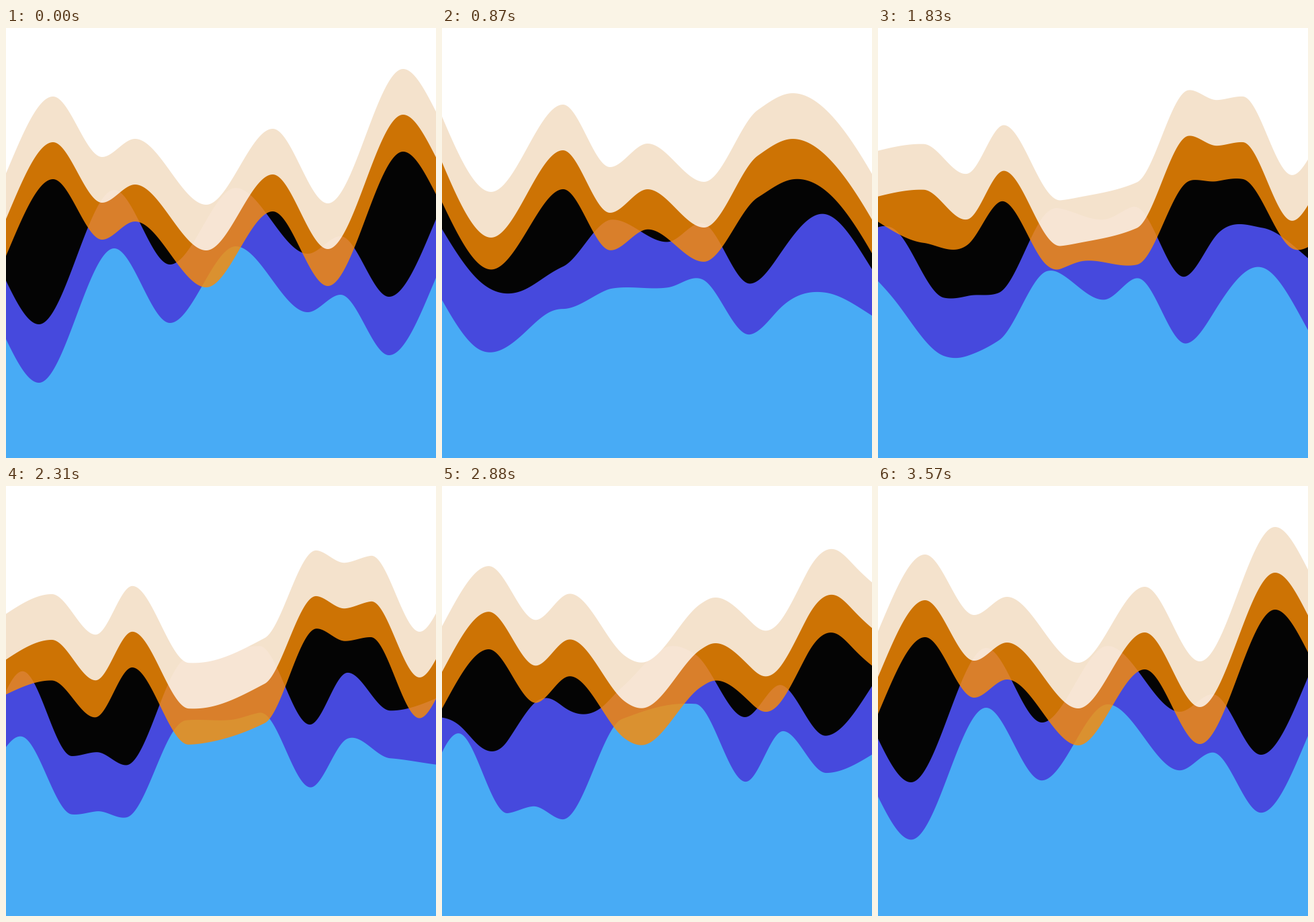
These frames come from a looping animation (640x640 px, 3630 ms). A matplotlib script:

```python
import numpy as np
import matplotlib.pyplot as plt
from matplotlib.animation import FuncAnimation
from matplotlib.patches import Polygon

SIZE = 640
STEP = 30          # ms per frame
FRAMES = 121       # the last pose is held for two steps

x = np.linspace(-2, SIZE + 2, 645)


def wave(*points):
    """Smooth line that is level at each crest and trough among the points."""
    px, py = np.array(points, float).T
    d = np.diff(py) / np.diff(px)
    a, b = d[:-1], d[1:]
    slope = np.zeros_like(px)
    slope[1:-1] = 2 * np.maximum(a * b, 0) / (a + b + 1e-9)
    i = np.searchsorted(px, x) - 1
    h = px[i + 1] - px[i]
    u = (x - px[i]) / h
    rise = u * u * (3 - 2 * u)
    bend = slope[i] * (1 - u) - slope[i + 1] * u
    return py[i] + (py[i + 1] - py[i]) * rise + h * u * (1 - u) * bend


# Three poses per wave, each given by its crests and troughs
upper = [
    wave((-60, 375), (70, 170), (143, 260), (192, 233), (298, 331),
         (397, 218), (479, 329), (591, 129), (690, 258)),
    wave((-80, 71), (73, 312), (180, 182), (250, 275), (306, 240),
         (390, 297), (470, 190), (522, 165), (860, 594)),
    wave((-80, 289), (68, 232), (133, 291), (188, 216), (272, 332),
         (385, 298), (462, 156), (505, 176), (543, 170), (615, 292),
         (680, 198)),
]
lower = [
    wave((-60, 288), (49, 441), (161, 241), (244, 352), (342, 238),
         (449, 336), (498, 310), (570, 400), (700, 193)),
    wave((-160, 98), (117, 405), (180, 371), (252, 275), (336, 331),
         (388, 293), (459, 388), (567, 257), (700, 456)),
    wave((-60, 428), (25, 274), (98, 402), (135, 396), (179, 417),
         (268, 256), (377, 236), (452, 354), (508, 276), (572, 337),
         (720, 285)),
]


def ease(u):
    return 2 * u * u if u < .5 else 1 - 2 * (1 - u) ** 2


def morph(poses, arrivals, t):
    """Wave at time t, going through the poses and back to the first."""
    start = 0
    for k, end in enumerate(arrivals):
        if t < end:
            p = ease((t - start) / (end - start))
            return poses[k] * (1 - p) + poses[(k + 1) % 3] * p
        start = end
    return poses[0]


LEAD = (885, 2120, 3330)
TOP, BOTTOM = -2, SIZE + 2

# poses, arrival times in ms, y offset, edge filled to, colour, opacity
layers = [
    (lower, (1180, 2480, 3240), 0, BOTTOM, "#4649dd", 1),
    (lower, (1490, 2740, 3640), 87, BOTTOM, "#48abf5", 1),
    (upper, (1040, 2490, 3120), 55, TOP, "#fb8c04", .82),
    (upper, LEAD, 0, TOP, "white", .8),
    (upper, LEAD, -68, TOP, "white", 1),
]

fig = plt.figure(figsize=(6.4, 6.4), dpi=100, facecolor="#040404")
ax = fig.add_axes([0, 0, 1, 1])
ax.set_xlim(0, SIZE)
ax.set_ylim(SIZE, 0)
ax.axis("off")

shapes = [ax.add_patch(Polygon([(0, 0), (1, 0), (1, 1)], fc=color,
                               alpha=alpha, lw=0))
          for *_, color, alpha in layers]


def draw(frame):
    t = min(frame, FRAMES - 2) * STEP
    for shape, (poses, arrivals, dy, edge, *_) in zip(shapes, layers):
        line = np.column_stack([x, morph(poses, arrivals, t) + dy])
        shape.set_xy(np.vstack([line, (x[-1], edge), (x[0], edge)]))
    return shapes


anim = FuncAnimation(fig, draw, frames=FRAMES, interval=STEP,
                     init_func=lambda: draw(0), repeat=True, repeat_delay=0)
plt.show()
```
